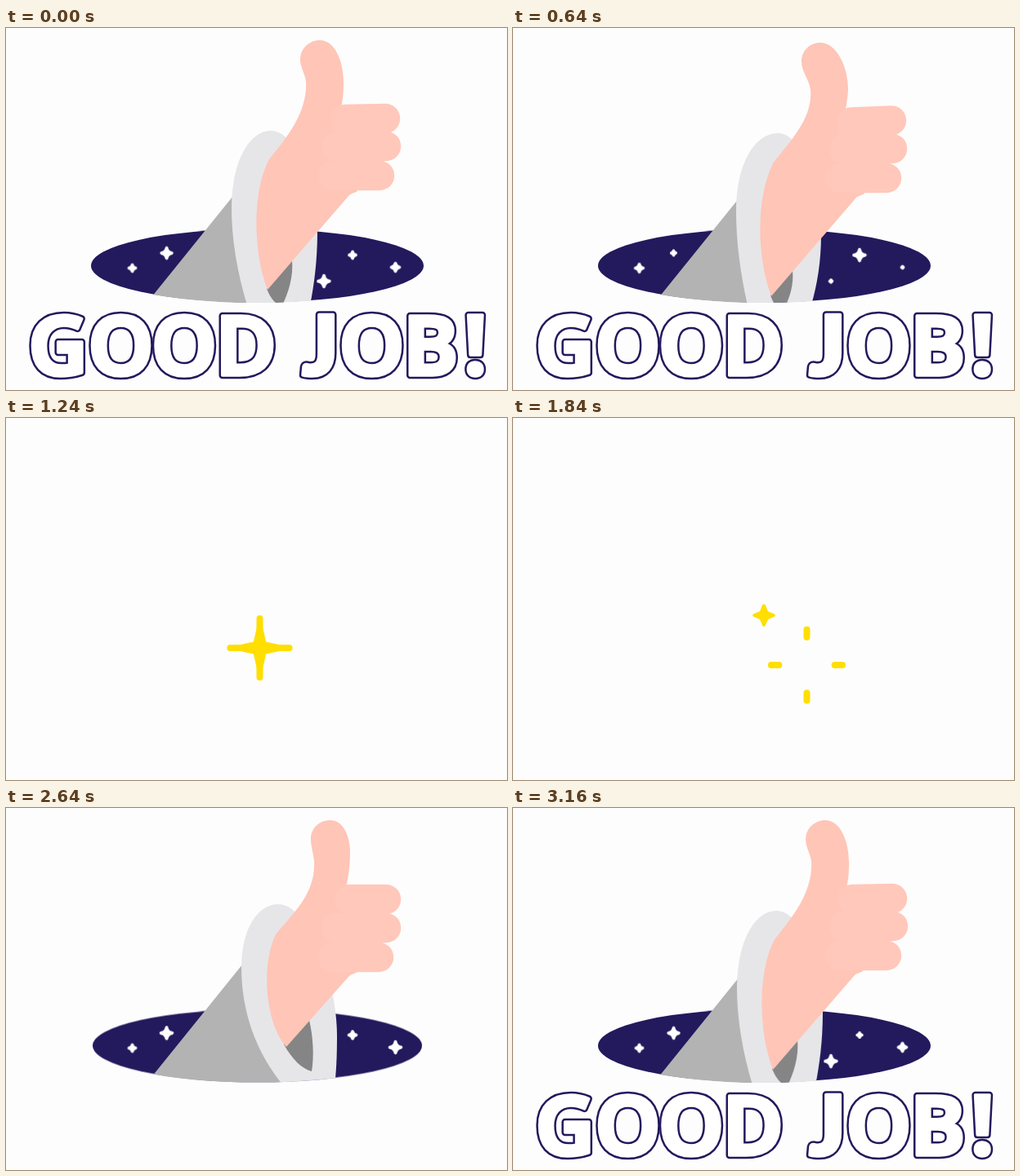
An HTML page for the animation above (3.2 s loop, 613 px wide and 444 px high).

```html
<!DOCTYPE html>
<html lang="en">
<head>
<meta charset="utf-8">
<title>Good job</title>
<style>
html, body { margin: 0; width: 100%; height: 100%; overflow: hidden; background: #fdfdfd; }
svg { display: block; width: 613px; height: 444px; }
svg * { animation-duration: 3.2s; animation-iteration-count: infinite; animation-timing-function: linear; }

/* the opening in the floor */
.hole { fill: #23195d; transform-origin: 307.5px 291.5px; animation-name: hole; }
@keyframes hole {
  0%, 25% { transform: scale(1); animation-timing-function: ease-in; }
  30% { transform: scale(.76); }
  34.5%, 67.5% { transform: scale(0); }
  70% { transform: scale(.61); }
  72.5% { transform: scale(.757); }
  76% { transform: scale(.91); }
  82.5% { transform: scale(.99); }
  87%, 100% { transform: scale(1); }
}
.twinkle { fill: #fff; stroke: #fff; stroke-width: 4; stroke-linejoin: round; vector-effect: non-scaling-stroke; animation-name: twinkle; }
@keyframes twinkle {
  0%, 100% { transform: scale(var(--a)); }
  20% { transform: scale(var(--b)); }
  72.5%, 82.5% { transform: scale(var(--c)); }
  98.75% { transform: scale(var(--d)); }
}

/* the arm */
.arm { animation-name: rise; }
@keyframes rise {
  0%, 26.5% { transform: none; animation-timing-function: ease-in; }
  30%, 70% { transform: translateY(150px); animation-timing-function: ease-out; }
  72.5%, 100% { transform: none; }
}
.sleeve { fill: #b3b3b3; animation-name: sleeve; }
@keyframes sleeve {
  0%, 100% { transform: none; }
  20% { transform: translateY(1px); animation-timing-function: ease-in; }
  27%, 72.5% { transform: translateY(58px); animation-timing-function: ease-out; }
  80% { transform: none; }
}
.pose { animation-name: pose, sway; }
@keyframes pose {
  0%, 100% { d: var(--rest); animation-timing-function: ease-in-out; }
  20% { d: var(--lean); animation-timing-function: ease-in; }
  27%, 72.5% { d: var(--fist); animation-timing-function: ease-out; }
  81%, 82.5% { d: var(--up); animation-timing-function: ease-in-out; }
  93% { d: var(--rest); }
}
@keyframes sway {
  0%, 84%, 100% { transform: none; }
  93% { transform: translateX(-3px); }
  98.75% { transform: translateX(-2px); }
}
.cuff {
  fill: #e6e6e9;
  --rest: path("M295 340C283 300 276 260 276 220C276 165 297 126 324 126C356 126 381 195 381 250C381 285 377 315 372 340Z");
  --lean: path("M287 340C278 300 273 262 273 224C273 168 295 129 324 129C355 129 377 198 377 253C377 288 372 315 365 340Z");
  --up: path("M339 340C306 300 288 250 288 195C288 150 307 118 333 118C370 118 405 210 405 280C405 305 404 325 402 340Z");
  --fist: path("M249 330C252 300 262 262 280 236C290 224 300 217 312 217C340 217 350 260 350 290C350 310 350 320 350 340Z");
}
.inside {
  fill: #858585;
  --rest: path("M319 320L350 284C352 305 345 326 338 340C330 340 324 332 319 320Z");
  --lean: path("M315 328L342 297C344 315 338 333 331 345C322 345 318 336 315 328Z");
  --up: path("M340 290L371 260C376 282 377 305 374 323C362 320 350 308 340 290Z");
  --fist: path("M300 340L330 300C335 310 335 325 330 340C325 342 310 342 300 340Z");
}
.hand {
  fill: #ffc5b6;
  --rest: path("M320 321C302 275 301 200 322 161C345 133 369 102 367 66C366 56 360 48 360 39C360 25 371 15 384 15C403 15 413 42 413 67C413 80 412 90 410 97L430 200C427 202 424 202 420 205Z");
  --lean: path("M316 329C298 280 297 210 318 166C340 138 367 110 364 76C363 64 353 54 353 41C353 28 363 18 376 18C397 18 410 50 410 74C410 84 408 92 407 100L430 203C427 205 424 205 420 208Z");
  --up: path("M343 293C318 265 311 195 330 155C352 128 379 105 377 65C376 55 373 47 373 38C373 25 383 15 397 15C413 15 421 35 421 55C421 70 419 85 416 97L430 201C427 203 424 203 420 206Z");
  --fist: path("M275 340C285 300 293 275 307 258C303 250 302 245 303 235C304 222 311 209 323 203C335 200 350 205 360 210C385 200 420 215 428 240C432 250 432 258 431 262L431 265C431 290 412 308 385 322Z");
}
.fingers {
  fill: none; stroke: #ffc8ba; stroke-width: 36.5; stroke-linecap: round;
  animation-name: pose;
  --rest: path("M415 112L464 111M405 145L465 145M400 181L457 181");
  --lean: path("M414 115.5L463 113.5M405 148L464 148M400 184L457 184");
  --up: path("M420 112L465 112M405 147L465 147M400 183L456 183");
  --fist: path("M342 240L342 205M377 245L377 207M411 255L411 218");
}

/* the lettering: a swollen dark copy under a slimmer white one */
.words { fill: #fff; stroke: #23195d; stroke-width: 8.5; stroke-linejoin: round; animation-name: words; }
.face { stroke: #fff; stroke-width: 3.5; }
text { font: 700 103px "Open Sans", sans-serif; }
.jay { font-family: Lato, sans-serif; font-weight: 900; }
@keyframes words {
  0%, 22.5% { opacity: 1; }
  26%, 83.5% { opacity: 0; }
  87%, 100% { opacity: 1; }
}

/* yellow bursts */
.spark { fill: #ffde00; stroke: #ffde00; stroke-width: 4; stroke-linejoin: round; animation-name: spark; }
@keyframes spark {
  0% { d: path("M0 0L0 0L0 0L0 0L0 0L0 0L0 0L0 0Z"); visibility: visible; }
  1.25% { d: path("M0 -11.5L3.4 -3.4L11.5 0L3.4 3.4L0 11.5L-3.4 3.4L-11.5 0L-3.4 -3.4Z"); }
  3.75% { d: path("M0 -33L6 -6L33 0L6 6L0 33L-6 6L-33 0L-6 -6Z"); }
  6% { d: path("M0 0L0 0L0 0L0 0L0 0L0 0L0 0L0 0Z"); visibility: visible; }
  6.01%, 100% { d: path("M0 0L0 0L0 0L0 0L0 0L0 0L0 0L0 0Z"); visibility: hidden; }
}
.ray { fill: none; stroke: #ffde00; stroke-linecap: round; animation-name: ray; }
@keyframes ray {
  0%, 1.25% { d: path("M0 0L0 -4"); stroke-width: 0; }
  3.75% { d: path("M0 0L0 -36"); stroke-width: 8; }
  6.25% { d: path("M0 -34L0 -43.5"); stroke-width: 8; }
  9.5% { d: path("M0 -54L0 -55"); stroke-width: 7; }
  10%, 100% { d: path("M0 -55L0 -55"); stroke-width: 0; }
}
</style>
</head>
<body>
<svg viewBox="0 0 613 444">
  <defs>
    <clipPath id="within"><ellipse class="hole" cx="307.5" cy="291.5" rx="203.5" ry="45"/></clipPath>
    <clipPath id="above"><path class="hole" d="M-9000 -9000H9000V291.5H511.4A203.9 45.5 0 0 1 103.6 291.5H-9000Z"/></clipPath>
  </defs>
  <ellipse class="hole" cx="307.5" cy="291.5" rx="203.5" ry="45"/>
  <g id="stars" clip-path="url(#within)"></g>
  <g clip-path="url(#above)">
    <g class="arm">
      <path class="sleeve" d="M168 342.5L300 178.5L340 346Z"/>
      <path class="pose cuff"/>
      <path class="pose inside"/>
      <path class="pose hand"/>
      <path class="fingers"/>
    </g>
  </g>
  <g class="words">
    <text id="words" y="426.3">GOOD <tspan class="jay">J</tspan>OB!</text>
    <use class="face" href="#words"/>
  </g>
  <g id="bursts"></g>
</svg>
<script>
const byId = id => document.getElementById(id);
const star = 'M0 -10Q1.5 -1.5 10 0Q1.5 1.5 0 10Q-1.5 1.5 -10 0Q-1.5 -1.5 0 -10Z';

// x, y, then the star's scale at four moments of the loop
const stars = [
  [154.5, 294.5, .38, .46, .38, .38],
  [196.5, 276, .62, .25, .67, .62],
  [236, 302, .78, .78, .78, .78],
  [389, 310.5, .67, .12, .67, .67],
  [424, 278.5, .38, .67, .42, .25],
  [476.5, 293.5, .48, .08, .67, .48]
];
byId('stars').innerHTML = stars.map(([x, y, a, b, c, d]) =>
  `<g transform="translate(${x} ${y})"><path class="twinkle" d="${star}"
    style="--a:${a};--b:${b};--c:${c};--d:${d}"/></g>`).join('');

// x, y, start in ms
const bursts = [
  [310.5, 282, 1120],
  [265, 276, 1360],
  [359.5, 303, 1640],
  [307, 242, 1800],
  [237, 296, 1920]
];
byId('bursts').innerHTML = bursts.map(([x, y, start]) => {
  const delay = `style="animation-delay:${start - 3200}ms"`;
  const rays = [0, 90, 180, 270].map(turn =>
    `<g transform="rotate(${turn})"><path class="ray" ${delay}/></g>`).join('');
  return `<g transform="translate(${x} ${y})">${rays}<path class="spark" ${delay}/></g>`;
}).join('');

// Place each letter by the centre of its ink.
const pen = document.createElement('canvas').getContext('2d');
const centres = [62.5, 140, 217.5, 295.5, 340, 382, 447, 521.5, 574];
byId('words').setAttribute('x', [...'GOOD JOB!'].map((ch, i) => {
  pen.font = ch === 'J' ? '900 103px Lato, sans-serif' : '700 103px "Open Sans", sans-serif';
  const ink = pen.measureText(ch);
  return centres[i] + (ink.actualBoundingBoxLeft - ink.actualBoundingBoxRight) / 2;
}).join(' '));
</script>
</body>
</html>
```
